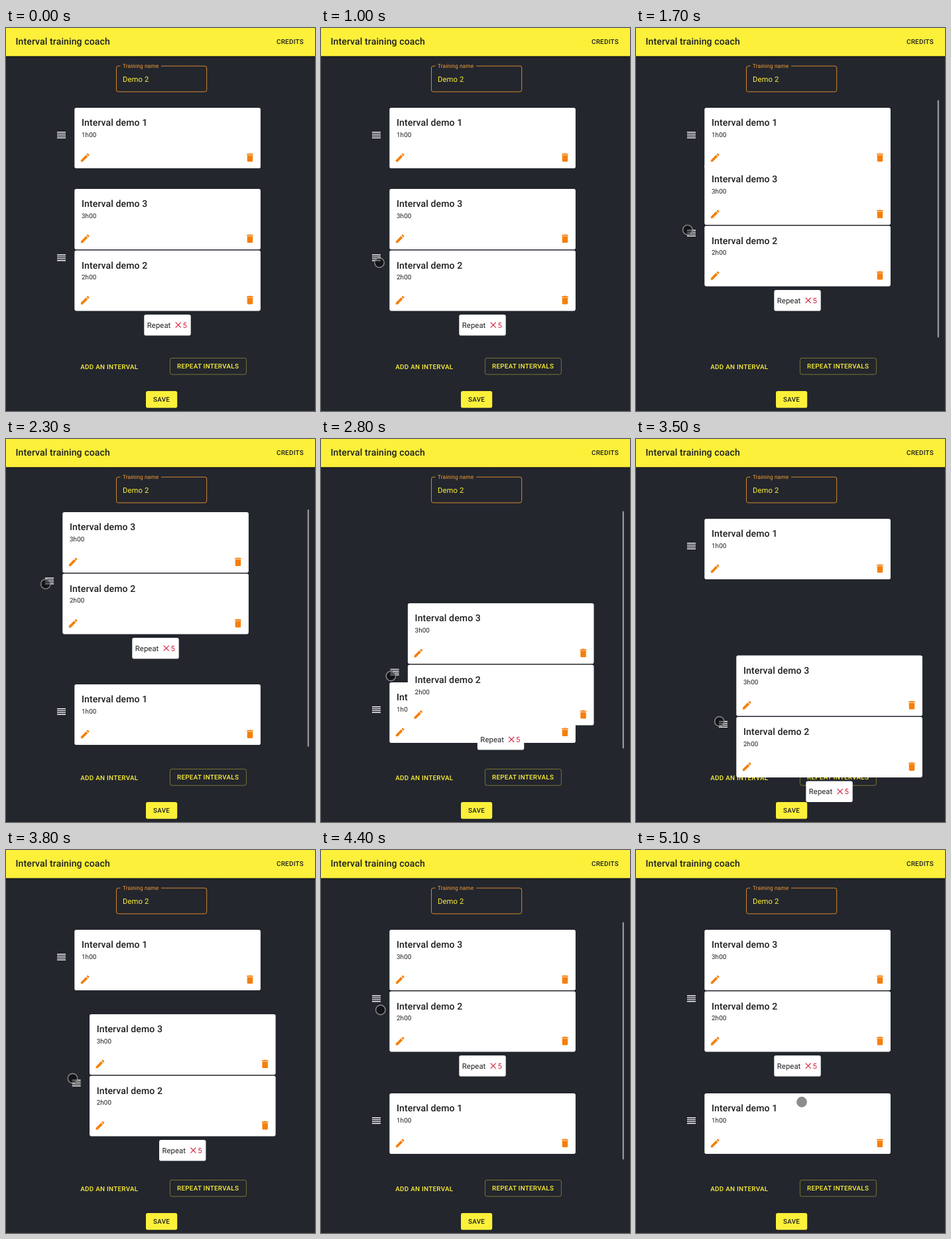
Write an HTML page that moves like this. It is 466x576 px and loops after 5.2 s.

```html
<!DOCTYPE html>
<html lang="en">
<head>
<meta charset="utf-8">
<title>Interval training coach</title>
<style>
  html, body { margin: 0; width: 100%; height: 100%; overflow: hidden; background: #23262d; }
  svg { display: block; width: 466px; height: 576px; }
  text { font-family: Roboto, "Liberation Sans", sans-serif; font-size: 9.84px; fill: #1d1e20; text-rendering: geometricPrecision; }
  .h6 { font-size: 14.06px; font-weight: 500; letter-spacing: .0075em; }
  .body { font-size: 11.25px; letter-spacing: .009em; }
  .small { letter-spacing: .011em; }
  .label { font-size: 8.44px; letter-spacing: .009em; fill: #f09a35; }
  .button { font-weight: 500; letter-spacing: .0286em; }
  .yellow { fill: #fcf03a; }
  .red { fill: #d5203a; }
  .icon { fill: #f57f0a; }
  .paper { fill: #fff; }
</style>
</head>
<body>
<svg viewBox="0 0 466 576">
  <defs>
    <path id="edit" transform="scale(.703)" d="M3 17.25V21h3.75L17.81 9.94l-3.75-3.75L3 17.25zM20.71 7.04c.39-.39.39-1.02 0-1.41l-2.34-2.34c-.39-.39-1.02-.39-1.41 0l-1.83 1.83 3.75 3.75 1.83-1.83z"/>
    <path id="trash" transform="scale(.703)" d="M6 19c0 1.1.9 2 2 2h8c1.1 0 2-.9 2-2V7H6v12zM19 4h-3.5l-1-1h-5l-1 1H5v2h14V4z"/>
    <path id="handle" d="M77-4.2h13m-13 2.8h13m-13 2.8h13m-13 2.8h13" stroke="#f2f2f3" stroke-width="1.4"/>
    <linearGradient id="shade" x2="0" y2="1">
      <stop stop-color="#000" stop-opacity=".35"/><stop offset="1" stop-color="#000" stop-opacity="0"/>
    </linearGradient>
  </defs>
  <rect width="466" height="576" fill="#23262d"/>
  <rect y="42" width="466" height="4" fill="url(#shade)"/>
  <rect width="466" height="42.3" class="yellow"/>
  <text x="14.5" y="25.3" class="h6">Interval training coach</text>
  <text x="408" y="24" class="button">CREDITS</text>

  <rect x="166.500" y="57.200" width="136.200" height="38.700" rx="2.800" fill="none" stroke="#e8922f" stroke-width=".9"/>
  <rect x="172.500" y="56" width="61.500" height="3" fill="#23262d"/>
  <text x="176" y="59.800" class="label">Training name</text>
  <text x="176" y="80.800" class="body yellow">Demo 2</text>

  <text x="112.300" y="513" class="button yellow">ADD AN INTERVAL</text>
  <rect x="247.400" y="496.400" width="115" height="24.600" rx="2.800" fill="none" stroke="#837f35" stroke-width=".9"/>
  <text x="258" y="512.200" class="button yellow">REPEAT INTERVALS</text>
  <rect x="211" y="546" width="47.200" height="25.200" rx="2.800" class="yellow"/>
  <text x="222" y="562" class="button">SAVE</text>

  <g id="single"></g>
  <g id="group"></g>
  <rect id="bar" x="454.700" y="108.500" width="2.200" height="357" rx="1.100" fill="#9a9b9f"/>
  <circle id="cursor" r="7.200" fill="#000" fill-opacity=".45" stroke="#8b8b8c" stroke-width="1.400"/>
</svg>
<script>
const LOOP = 5200, TICK = 100;
const SINGLE_Y = 120, GROUP_Y = 242, SHIFT = 246, HANDLE_Y = 103.5;
const GRAB = 1500, DROP = 4250, LAG = 20;
const $ = id => document.getElementById(id);

const card = (y, name, time) => `<g transform="translate(103.3 ${y})">
  <rect class="paper" width="280.600" height="91" rx="2.800"/>
  <text class="h6" x="10.700" y="27.200">${name}</text>
  <text class="small" x="10.700" y="44">${time}</text>
  <g class="icon"><use href="#edit" x="7.500" y="66.500"/><use href="#trash" x="256.200" y="66.300"/></g></g>`;
const handle = y => `<use href="#handle" y="${y}"/>`;

$("single").innerHTML = handle(41) + card(0, "Interval demo 1", "1h00");
$("group").innerHTML = handle(HANDLE_Y) + card(0, "Interval demo 3", "3h00") +
  card(92.4, "Interval demo 2", "2h00") +
  `<rect class="paper" x="208.300" y="189" width="70.400" height="31.500" rx="2.800"/>
  <text class="body" x="212.800" y="208.800">Repeat</text>
  <path d="M255.700 200.700l8 8m0-8l-8 8" stroke="#d5203a" stroke-width="1.200"/>
  <text class="body red" x="266.500" y="208.800">5</text>`;

// Hand's path while dragging: time, x, y
const path = [
  [GRAB, 0, 0], [1700, 0, -37], [2100, -20, -142], [2300, -18, -132], [3100, 56, 91],
  [3250, 66, 125], [3800, 22.7, 5], [4100, 8, -142], [4300, 12, -105]
];

const clamp = p => Math.min(1, Math.max(0, p));
const mix = (a, b, p) => a + (b - a) * p;
const smooth = p => p * p * (3 - 2 * p);
const progress = (t, start, length) => clamp((t - start) / length);

function slope(i, axis) {
  const a = path[i - 1], b = path[i + 1];
  return a && b ? (b[axis] - a[axis]) / (b[0] - a[0]) : 0;
}

// Hermite spline through the path
function hand(t, axis) {
  const last = path.length - 1;
  t = Math.min(path[last][0], Math.max(GRAB, t));
  const i = Math.min(last - 1, path.findLastIndex(k => k[0] <= t));
  const a = path[i], b = path[i + 1], span = b[0] - a[0], p = (t - a[0]) / span;
  return mix(a[axis], b[axis], smooth(p)) +
    span * p * (1 - p) * (slope(i, axis) * (1 - p) - slope(i + 1, axis) * p);
}

// cubic-bezier(.2, 0, 0, 1)
function ease(p) {
  let lo = 0, hi = 1;
  for (let i = 0; i < 24; i++) {
    const s = (lo + hi) / 2;
    if (.6 * (1 - s) ** 2 * s + s ** 3 < p) lo = s; else hi = s;
  }
  return smooth(lo);
}

const swap = (t, start) => ease(progress(t, start, 200));
const move = (el, x, y) => el.setAttribute("transform", `translate(${x} ${y})`);
const show = (el, on) => el.setAttribute("visibility", on ? "visible" : "hidden");

// The pointer leads the group slightly, since the page lags behind it.
function pointer(t) {
  const enter = 1 - (1 - progress(t, 100, 1100)) ** 2;
  const leave = progress(t, 4500, 600);
  const x = mix(388, 77.8 + hand(t, 1), enter);
  const y = mix(572, GROUP_Y + HANDLE_Y + hand(t + LAG, 2), enter);
  return [mix(x, 250, leave), mix(y, 379, leave)];
}

function draw(now) {
  const t = Math.floor(now % LOOP / TICK) * TICK;
  const drop = smooth(progress(t, DROP, 150));
  const scroll = t >= 2100 && t < 2600 ? 3 : 0;
  const swapped = swap(t, 2000) - swap(t, 3007) + swap(t, 4050);
  move($("group"), mix(hand(t, 1), 0, drop), GROUP_Y + mix(hand(t, 2), -122, drop));
  move($("single"), 0, SINGLE_Y + SHIFT * swapped + scroll);
  move($("bar"), 0, -scroll * .85);
  show($("bar"), t >= 1300 && t < 3400 || t >= 4000 && t < 4900);
  move($("cursor"), ...pointer(t));
  show($("cursor"), t >= 100);
}

function loop() {
  draw(performance.now());
  requestAnimationFrame(loop);
}
loop();
</script>
</body>
</html>
```
